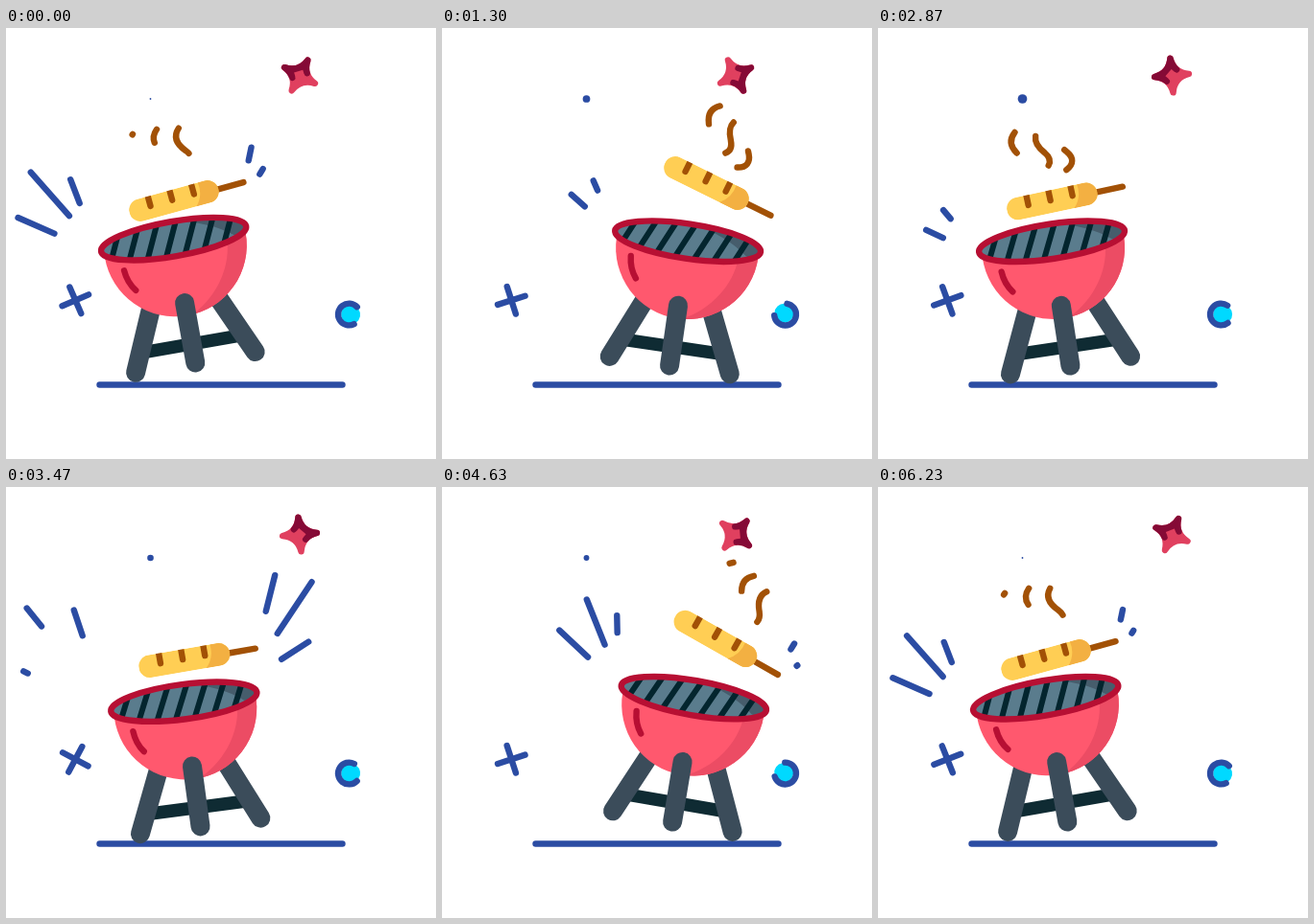
An HTML page that plays this animation: 448x450 px, repeating every 6260 ms.

```html
<!DOCTYPE html>
<html lang="en">
<head>
<meta charset="utf-8">
<title>Barbecue</title>
<style>
  html, body { margin: 0; width: 100%; height: 100%; overflow: hidden; background: #fff; }
  svg { display: block; width: 448px; height: 450px; }
  .line { fill: none; stroke-linecap: round; stroke-linejoin: round; stroke-width: 6.4; }
  .blue { stroke: #2b4ca3; }
  .brown { stroke: #a25106; }
  .leg { stroke: #3b4c5a; stroke-width: 20; }
</style>
</head>
<body>
<svg viewBox="0 0 448 450">
  <defs>
    <clipPath id="bowlClip"><path d="M-74.5,-130V-124A74.5,74.5 0 0 0 74.5,-124V-130Z"/></clipPath>
    <clipPath id="rimClip"><ellipse cx="-.5" cy="-130.8" rx="76.7" ry="18.2"/></clipPath>
    <clipPath id="foodClip"><rect x="-48" y="-11.8" width="96" height="23.6" rx="11.8"/></clipPath>
  </defs>

  <path class="line blue" d="M97.5,372.5H350.5"/>
  <circle id="dot" cx="150.5" cy="74" fill="#2b4ca3"/>
  <path id="cross" class="line blue" d="M-15,0H15M0,-15V15"/>

  <g id="ring">
    <circle cx="1.6" r="10" fill="#00d9ff"/>
    <path class="line blue" d="M6.8,9.1A11.4,11.4 0 1 1 6.8,-9.1"/>
  </g>

  <g id="star">
    <path class="line" style="fill:#e0405f" stroke="#e0405f"
      d="M12.7,-12.7Q3.5,0 12.7,12.7Q0,3.5 -12.7,12.7Q-3.5,0 -12.7,-12.7Q0,-3.5 12.7,-12.7Z"/>
    <path class="line" style="fill:#850a36" stroke="#850a36"
      d="M0,-8Q6.35,-8.1 12.7,-12.7Q3.5,0 12.7,12.7Q6.35,8.1 0,8"/>
    <path d="M-4,-4.8H4.5V4.8H-4Z" fill="#e0405f"/>
  </g>

  <g id="grill">
    <path d="M-50,-19.5H50" stroke="#0f2b33" stroke-width="13.5"/>
    <path class="line leg" d="M-63.5,0L-35,-66M63,0L33,-66"/>
    <g clip-path="url(#bowlClip)">
      <rect x="-75" y="-131" width="150" height="83" fill="#ff586e"/>
      <path d="M54,-131V-120C53,-92 33,-62 2,-48H80V-131Z" fill="#ec4c64"/>
    </g>
    <path class="line" stroke="#b70f33" d="M-57,-107Q-56,-94 -48.5,-84.7"/>
    <g clip-path="url(#rimClip)">
      <rect x="-80" y="-152" width="160" height="44" fill="#5a7c8d"/>
      <path d="M0,-150Q40,-142 62,-124L90,-120V-152H0Z" fill="#465d6c"/>
      <path id="bars" stroke="#03252e" stroke-width="6"/>
    </g>
    <ellipse class="line" cx="-.5" cy="-130.8" rx="76.7" ry="18.2" stroke="#b70f33"/>
    <path class="line leg" d="M-.7,-63L-.4,.5"/>
    <g id="rays"></g>
  </g>

  <g id="food">
    <path class="line brown" d="M44,.5H75"/>
    <g clip-path="url(#foodClip)">
      <rect x="-48" y="-12" width="96" height="24" fill="#ffce54"/>
      <path d="M29,-12Q31,2 21,12H50V-12Z" fill="#f3b042"/>
      <path class="line brown" d="M-25,-16V-1.2M-1.5,-16V-1.2M22,-16V-1.2"/>
    </g>
    <g id="steam"></g>
  </g>
</svg>

<script>
const HALF = 1565, FULL = 2 * HALF, LOOP = 2 * FULL;
const DRAW = 633, LAG = 320;
const $ = id => document.getElementById(id);
const mod = (a, n) => ((a % n) + n) % n;
const ease = x => { x = Math.min(1, Math.max(0, x)); return x * x * (3 - 2 * x); };

// Eased back and forth: a at time t0, b half a period later.
function swing(t, t0, a, b) {
  const x = mod(t - t0, FULL) / HALF;
  return a + (b - a) * ease(x < 1 ? x : 2 - x);
}

function place(id, x, y, angle) {
  $(id).setAttribute('transform', `translate(${x} ${y}) rotate(${angle})`);
}

// A stroke that grows from its first point, then vanishes towards its last.
function addStroke(parent, color, d, start) {
  const el = document.createElementNS('http://www.w3.org/2000/svg', 'path');
  el.setAttribute('class', 'line ' + color);
  el.setAttribute('d', d);
  $(parent).append(el);
  return { el, start, len: el.getTotalLength() };
}

function trim({ el, start, len }, t) {
  const p = mod(t - start, HALF);
  const head = len * ease(p / DRAW), tail = len * ease((p - LAG) / DRAW);
  const seen = head - tail;
  el.style.visibility = seen < 0.8 ? 'hidden' : 'visible';
  el.style.strokeDasharray = `${seen} ${len + 50}`;
  el.style.strokeDashoffset = -tail;
}

const rays = [
  'M-112,-151L-162,-184.2',
  'M-101.3,-169.6L-150,-249',
  'M-90.6,-184.3L-101.6,-240.5',
  'M90.5,-198L112,-252.5',
  'M99.5,-182L161.5,-253',
  'M106,-161.5L160.5,-187.3'
].map((d, i) => addStroke('rays', 'blue', d, -500 + 100 * i));

const steam = [[0, 0, 660], [25.5, 1.7, 840], [48.5, 6, 990]].map(([x, y, start]) =>
  addStroke('steam', 'brown',
    `M${x - 27},${y - 35}c9,-4 10,-11 4.5,-18c-7.5,-9 -9.5,-18 -.5,-25.5`, start));

$('bars').setAttribute('d', [-3, -2, -1, 0, 1, 2, 3]
  .map(i => `M${20 * i - 13.3},-108.8l20,-44`).join(''));

function render(t) {
  const a = swing(t, 0, -9.9, 9.9), aa = a * a;
  place('grill', 219.2 + 2.18 * a, 360.4 - 0.117 * aa, a);
  place('food', 224.1 + 5.584 * a + 0.0626 * aa, 176.95 - 1.128 * a - 0.0777 * aa, 7.2 + 2.28 * a);
  place('star', 306, 49.5, swing(t, -505, -152, 30));
  place('ring', 357.5, 299, swing(t, 0, 10, -145));
  place('cross', 72.3, 284.3, swing(t, -160, 162, -20));

  const p = mod(t, LOOP / 3) / 950;
  $('dot').setAttribute('r', 0.9 + 4.3 * ease(p < 1 ? p : 2 - p));

  for (const s of rays) trim(s, t);
  for (const s of steam) trim(s, t);
}

const begin = performance.now();
function tick() {
  render((performance.now() - begin) % LOOP);
  requestAnimationFrame(tick);
}
tick();
</script>
</body>
</html>
```
